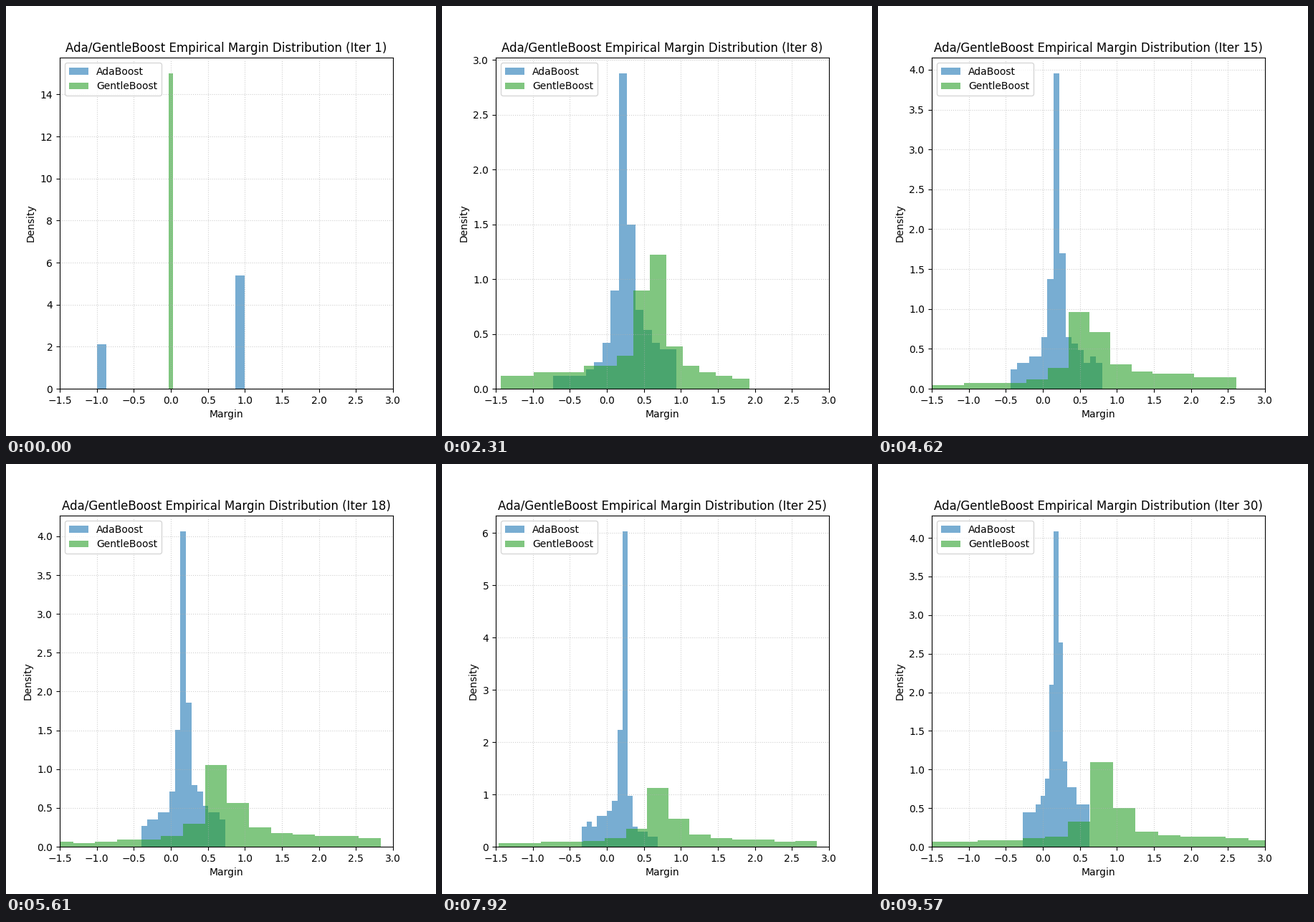
A matplotlib script that plays this animation: 600 px wide and 600 px high, repeating every 9900 ms.

```python
import numpy as np
import matplotlib.pyplot as plt
from matplotlib.animation import FuncAnimation

N_ITERS = 30
INTERVAL = 330
BINS = 15
N = 150
TAIL = 2  # how fast the margins thin out away from the peak


def steps(n):
    return (np.arange(n) + 0.5) / n


def peaked(lo, hi, peak, below, inside):
    """Sorted margins on [lo, hi]: an even peak bin between two power tails."""
    width = (hi - lo) / BINS
    left = lo + peak * width
    right = left + width
    margins = np.concatenate([
        left - (left - lo) * steps(below)[::-1] ** TAIL,
        left + width * steps(inside),
        right + (hi - right) * steps(N - below - inside) ** TAIL,
    ])
    margins[0], margins[-1] = lo, hi
    return margins


# Key iterations; every margin drifts linearly from one to the next.
ITERS = [1, 5, 11, 15, 21, 25, 30]

ADA = np.array([
    np.repeat([-1.0, 1.0], [42, 108]),
    peaked(-0.818, 1.0, 8, 20, 51),
    peaked(-0.633, 0.884, 8, 47, 48),
    peaked(-0.4355, 0.8035, 7, 46, 49),
    peaked(-0.3625, 0.6625, 7, 46, 39),
    peaked(-0.339, 0.689, 8, 64, 62),
    peaked(-0.274, 0.632, 7, 50, 37),
])

GENTLE = np.array([
    np.zeros(N),
    peaked(-1.326, 1.326, 10, 70, 58),
    peaked(-1.534, 2.516, 8, 66, 39),
    peaked(-1.6355, 2.613, 7, 29, 41),
    peaked(-1.597, 3.056, 7, 41, 49),
    peaked(-1.461, 2.8355, 7, 41, 48),
    peaked(-1.496, 3.083, 7, 40, 50),
])


def margins_at(keys, it):
    return np.array([np.interp(it, ITERS, path) for path in keys.T])


fig, ax = plt.subplots(figsize=(6, 6), dpi=100)


def draw(i):
    it = i + 1
    ax.clear()
    for keys, color, label in ((ADA, "tab:blue", "AdaBoost"),
                               (GENTLE, "tab:green", "GentleBoost")):
        ax.hist(margins_at(keys, it), bins=BINS, density=True,
                alpha=0.6, color=color, label=label)
    ax.set_xlim(-1.5, 3.0)
    ax.set_title(f"Ada/GentleBoost Empirical Margin Distribution (Iter {it})")
    ax.set_xlabel("Margin")
    ax.set_ylabel("Density")
    ax.grid(True, linestyle=":", alpha=0.6)
    ax.legend(loc="upper left")
    return ax.patches


anim = FuncAnimation(fig, draw, frames=N_ITERS, interval=INTERVAL,
                     repeat=True, repeat_delay=0, blit=False)
plt.show()
```
